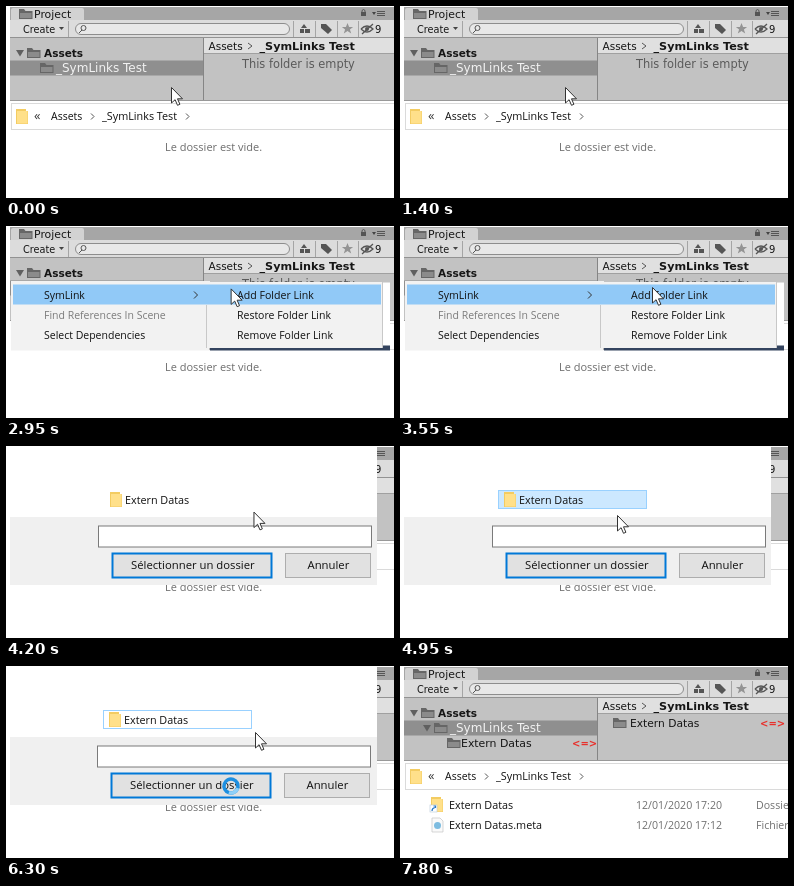
These frames come from a looping animation (388 px wide and 192 px high, 8000 ms). An HTML page:

```html
<!DOCTYPE html>
<html lang="fr">
<head>
<meta charset="utf-8">
<title>Folder link demo</title>
<style>
  html, body { margin: 0; width: 100%; height: 100%; overflow: hidden; background: #fff; }
  svg { display: block; width: 388px; height: 192px; }
  text { white-space: pre; font-family: "Open Sans", sans-serif; }
  .ed { font-family: "DejaVu Sans", Verdana, sans-serif; }
  .b { font-weight: bold; }
</style>
</head>
<body>
<svg id="stage" viewBox="0 0 388 192"></svg>
<script>
const rect = (x, y, w, h, fill, extra = '') =>
  `<rect x="${x}" y="${y}" width="${w}" height="${h}" fill="${fill}" ${extra}/>`;
const text = (s, x, y, size, fill = '#111', cls = '') =>
  `<text x="${x}" y="${y}" font-size="${size}" fill="${fill}" class="${cls}">${s}</text>`;
const path = (d, fill, extra = '') => `<path d="${d}" fill="${fill}" ${extra}/>`;
const line = (d, color, w = 1) => path(d, 'none', `stroke="${color}" stroke-width="${w}"`);
const group = (id, body) => `<g id="${id}">${body}</g>`;
const ed = (s, x, y, size, fill = '#111', bold = '') => text(s, x, y, size, fill, 'ed ' + bold);

const grayFolder = (x, y) =>
  path(`M${x} ${y}h5l1.5 2h7v8h-13.5z`, '#666') +
  path(`M${x + 1} ${y + 4}h11.5v5h-11.5z`, '#8b8b8b');
const yellowFolder = (x, y) =>
  path(`M${x} ${y}h10v2h2v13h-12z`, '#f3cc62') +
  rect(x + 1, y + 2, 10.5, 12.5, '#ffe08a');
const triangle = (x, y) => path(`M${x} ${y}h8l-4 6.5z`, '#606060');
const linkMark = (x, y) => ed('&lt;=&gt;', x, y, 10, '#e8302c', 'b');

function editorWindow(linked) {
  const ink = '#161616';
  let s = rect(4, 1, 384, 94, '#c2c2c2') + rect(4, 1, 384, 13, '#a6a6a6') +
    path('M5 14V4q0-2 2-2H76q2 0 2 2V14z', '#d2d2d2') +
    grayFolder(13, 3) + ed('Project', 28, 12, 10.9, ink) +
    rect(355, 6, 5, 4, '#555') + line('M356 6V4.5q1.5-2 3 0V6', '#555') +
    path('M366 6h4l-2 3z', '#444') + line('M371 5.5h8M371 7.5h8M371 9.5h8', '#555') +
    rect(4, 14, 384, 17, '#dcdcdc') + line('M4 31.5H388', '#929292') +
    ed('Create', 17, 27, 9.7, ink) + path('M53 21h5l-2.5 3z', '#444') +
    line('M62.5 15V31M287.5 15V31M309.5 15V31M331.5 15V31M352.5 15V31', '#a5a5a5') +
    rect(69.5, 17.5, 214, 11, '#e8e8e8', 'rx="5.5" stroke="#8d8d8d"') +
    '<circle cx="77.5" cy="22" r="2.5" fill="none" stroke="#555"/>' + line('M76 24l-3 3', '#555') +
    path('M298 18l3 4h-6zM294 23h4v4h-4zM299 23h5v4h-5z', '#555') +
    path('M315 18h5l6 6-4 4-7-6z', '#555') +
    path('M341.5 17l1.6 4h4l-3.2 2.5 1.3 4-3.7-2.5-3.7 2.5 1.3-4-3.2-2.5h4z', '#949494') +
    line('M355 23q6-6 12 0q-6 6-12 0M356 28L367 18', '#555', 1.3) +
    '<circle cx="361" cy="23" r="2" fill="#555"/>' + ed('9', 369, 27, 10, ink) +
    rect(198, 32, 190, 15, '#e0e0e0') + line('M198 47.5H388', '#a0a0a0') +
    ed('Assets', 202.5, 44, 10.5, ink) + line('M242 37l4 3-4 3', '#555') +
    ed('_SymLinks Test', 253.5, 44, 11.2, ink, 'b') +
    rect(4, 54.5, 193, 15, '#8f8f8f') +
    triangle(10, 44) + grayFolder(21, 42) + ed('Assets', 38, 51, 10.5, ink, 'b') +
    grayFolder(34, 57) + ed('_SymLinks Test', 50, 66, 12, '#f2f2f2') +
    line('M197.5 32V95', '#858585') + line('M4 94.5H388', '#999');
  if (linked) {
    s += triangle(23, 59) + grayFolder(47, 72) + ed('Extern Datas', 61, 81, 10.9, ink) +
      grayFolder(213, 52) + ed('Extern Datas', 230, 61, 10.7, ink) +
      linkMark(172, 81) + linkMark(360, 61);
  } else {
    s += ed('This folder is empty', 236, 62, 11.4, '#5a5a5a');
  }
  return s;
}

const addressBar = rect(5.5, 97.5, 386, 26, '#fff', 'stroke="#dadada"') +
  yellowFolder(10, 103) + text('«', 28, 114, 13, '#333') +
  text('Assets', 45, 114, 10.5) + line('M85 107.5l3 3-3 3M180 107.5l3 3-3 3', '#555') +
  text('_SymLinks Test', 96, 114, 10.8);

const fileRows = yellowFolder(31, 131) +
  rect(30, 139, 7, 7, '#fff', 'stroke="#b5c8d8" stroke-width=".6"') +
  line('M32 145q0-3 3-3.5M33.5 140h2v2', '#2878c8', 1.2) +
  text('Extern Datas', 49, 143, 10.8) + text('12/01/2020 17:20', 236, 143, 10.6, '#707070') +
  text('Dossier', 356, 143, 10.6, '#707070') +
  path('M32 152h8l3 3v11h-11z', '#fafafa', 'stroke="#c4c4c4" stroke-width=".7"') +
  '<circle cx="37.5" cy="159.5" r="3.5" fill="#7dbce0"/>' +
  text('Extern Datas.meta', 49, 163, 10.8) + text('12/01/2020 17:12', 236, 163, 10.6, '#707070') +
  text('Fichier', 356, 163, 10.6, '#707070');

const menu = rect(5, 55, 199, 69.5, '#f2f2f2') + rect(204, 56.5, 180, 63, '#fff') +
  rect(204, 119.5, 180, 5, '#34445f') + line('M203.5 79V124', '#b4b4b4') +
  rect(7, 58.5, 196, 20, '#91c9f7') + text('SymLink', 38, 72.5, 10.5) +
  line('M188 65.5l3.5 3.5-3.5 3.5', '#333') +
  text('Find References In Scene', 38, 92.5, 10.5, '#7b7b7b') +
  text('Select Dependencies', 38, 112.5, 10.5) +
  group('submenu', rect(200, 56, 177, 66, '#f2f2f2') + line('M200.5 79V122M376.5 56V122', '#c8c8c8') +
    rect(203, 58.5, 172, 20, '#91c9f7', 'id="addRow"') + rect(200, 58.5, 3, 20, '#91c9f7') +
    text('Add Folder Link', 231, 72.5, 10.6) + text('Restore Folder Link', 231, 92.5, 10.5) +
    text('Remove Folder Link', 231, 112.5, 10.5));

const dialog = rect(0, 0, 371, 71, '#fff') + rect(4, 71, 367, 68, '#f0f0f0') +
  group('dialogBody',
    rect(98.5, 44.5, 148, 18, '#fff', 'id="item"') + yellowFolder(104, 46) +
    text('Extern Datas', 119, 57.5, 10.8) +
    rect(92.5, 80, 273, 21, '#fff', 'stroke="#7a7a7a"') +
    rect(106.5, 107.5, 159, 24, '#e1e1e1', 'id="choose" stroke="#0078d7"') +
    text('Sélectionner un dossier', 125, 123, 11.3) +
    rect(279.5, 107.5, 85, 24, '#e1e1e1', 'stroke="#adadad"') +
    text('Annuler', 301.5, 123, 11.3)) +
  group('spinner', '<circle r="7" fill="none" stroke="#1d8fe0" stroke-width="3.5"/>' +
    line('M0-7A7 7 0 0 1 7 0', '#8fd0f8', 3.5));

const pointer = id => path('M0 0V15.5L3.6 12.2 6 17.8 8.4 16.8 6 11.3H11Z', '#fff',
  `id="${id}" stroke="#333" stroke-linejoin="round"`);

document.getElementById('stage').innerHTML =
  rect(0, 0, 388, 192, '#fff') + editorWindow(false) + addressBar +
  text('Le dossier est vide.', 159, 145, 11, '#6d6d6d') +
  pointer('idlePointer') +
  group('menu', menu + pointer('menuPointer')) +
  group('dialog', dialog + pointer('dialogPointer')) +
  group('result', rect(0, 0, 388, 192, '#fff') + editorWindow(true) + addressBar + fileRows);

const $ = id => document.getElementById(id);
const set = (id, attrs) => { for (const k in attrs) $(id).setAttribute(k, attrs[k]); };
const show = (id, on) => set(id, { visibility: on ? 'visible' : 'hidden' });
const ramp = (t, a, b) => Math.min(1, Math.max(0, (t - a) / (b - a)));

// Eased position along [time, x, y] stops
function along(stops, t) {
  let [, x, y] = stops[0];
  for (let i = 1; i < stops.length; i++) {
    const k = ramp(t, stops[i - 1][0], stops[i][0]);
    const e = k * k * (3 - 2 * k);
    x += (stops[i][1] - stops[i - 1][1]) * e;
    y += (stops[i][2] - stops[i - 1][2]) * e;
  }
  return [x, y];
}
const moveTo = (id, [x, y]) => set(id, { transform: `translate(${x + .5} ${y + .5})` });

const menuPath = [[2400, 134, 67], [3200, 252, 61]];
const dialogPath = [[4150, 249, 66], [4600, 204, 54], [4950, 217, 69], [5750, 226, 121]];

function draw(now) {
  const t = Math.floor(now % 8000 / 50) * 50;
  const dialogIn = ramp(t, 3600, 3900);
  set('menu', { opacity: ramp(t, 1700, 2050) * (1 - dialogIn) });
  set('dialog', { opacity: dialogIn });
  set('result', { opacity: ramp(t, 6450, 6750) });

  const menuPos = along(menuPath, t);
  moveTo('idlePointer', [165, 81]);
  show('idlePointer', t < 2050);
  moveTo('menuPointer', menuPos);
  show('submenu', t >= 2650);
  show('addRow', t >= 2650 && menuPos[0] > 203);

  const clicked = t >= 5850, picked = t >= 4600 && !clicked;
  const pos = along(dialogPath, t);
  const hover = !clicked && t > 5000 && pos[1] > 106;
  const away = picked && t >= 5200;
  set('item', {
    fill: away ? '#d9d9d9' : picked ? '#cce8ff' : '#fff',
    stroke: away ? '#d9d9d9' : picked || clicked ? '#99d1ff' : '#fff'
  });
  set('choose', { fill: hover ? '#cce4f7' : '#e1e1e1', 'stroke-width': hover ? 1 : 2 });
  set('dialogBody', { transform: `translate(${clicked ? -1 : 0} 0)` });
  set('spinner', { transform: `translate(225 120) rotate(${t * .36})` });
  show('spinner', clicked);
  moveTo('dialogPointer', clicked ? [249, 66] : pos);
  show('dialogPointer', !clicked || t >= 6100);
}

const start = performance.now();
(function tick() {
  draw(performance.now() - start);
  requestAnimationFrame(tick);
})();
</script>
</body>
</html>
```
